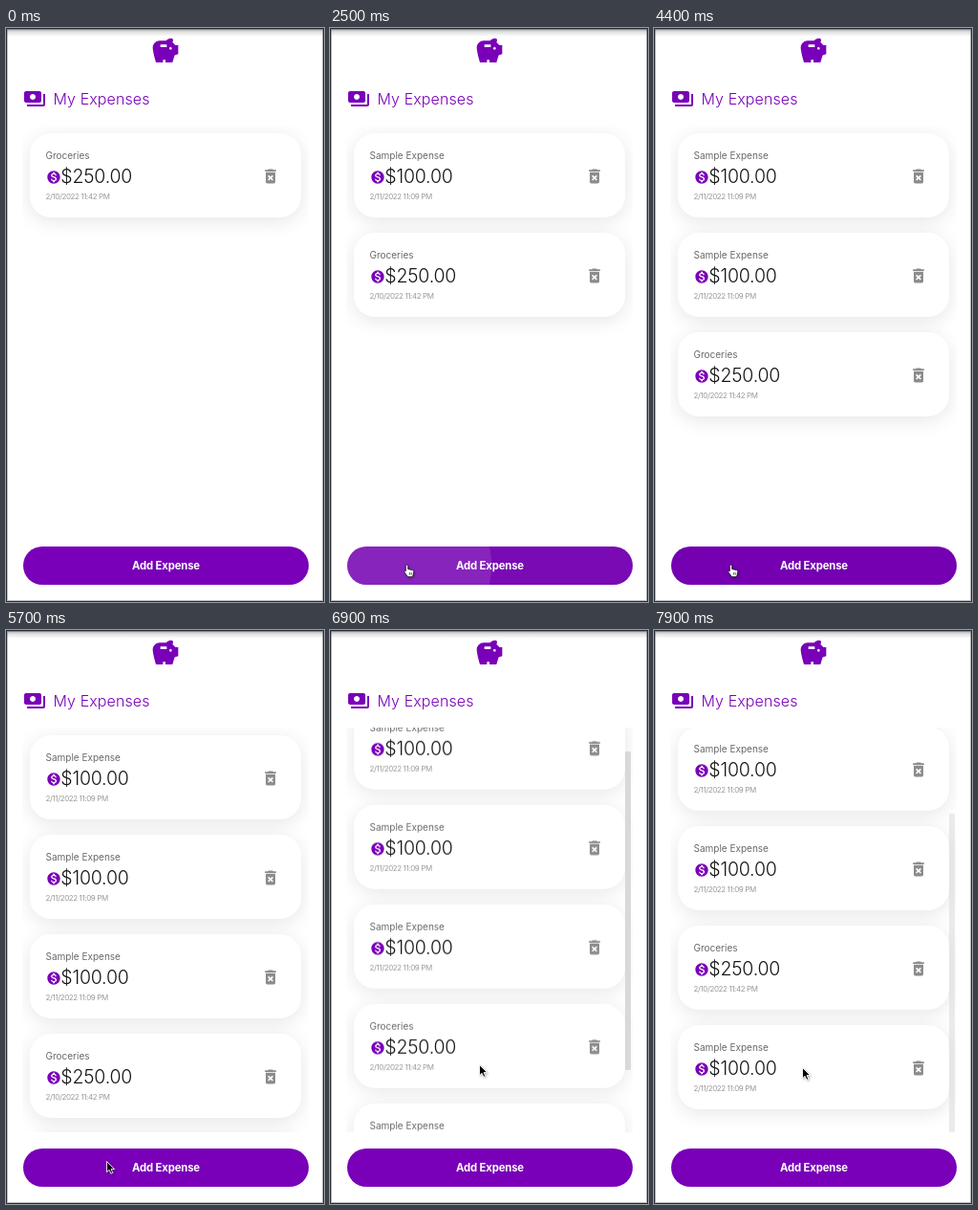
Animation of 333x600 px, one loop 8 s. Source, as an HTML page:

```html
<!DOCTYPE html>
<html lang="en">
<head>
<meta charset="utf-8">
<title>My Expenses</title>
<style>
  :root { --purple: #7900b8; --loop: 8s; }
  html, body { margin: 0; width: 100%; height: 100%; overflow: hidden; background: #fff; }
  body { position: relative; font-family: Inter, "Open Sans", sans-serif; white-space: nowrap; }
  body *, .press::after { position: absolute; box-sizing: border-box; }
  svg, path { overflow: visible; }
  symbol, defs { position: static; }

  .frame { inset: 0; box-shadow: inset 0 0 0 1px #262c39, inset 0 0 0 2px rgba(38,44,57,.3); }
  .top-shade { left: 0; right: 0; top: 0; height: 9px; background: linear-gradient(rgba(0,0,0,.42), rgba(0,0,0,.12) 45%, transparent); }
  .pig { left: 151.3px; top: 8.3px; width: 32px; height: 32px; fill: var(--purple); }
  .notes { left: 17.5px; top: 62px; width: 24px; height: 24px; fill: var(--purple); }
  .title { left: 49.5px; top: 64px; font-size: 16px; line-height: 21px; font-weight: 300; letter-spacing: .1px; color: var(--purple); }

  /* Expense list */
  .list { left: 17px; top: 102px; width: 300px; height: 423px; overflow: hidden; }
  .scroller { inset: 0; animation: scroll var(--loop) infinite; }
  .card { left: 8px; top: 8px; width: 284px; height: 88px; border-radius: 22px; background: #fff;
          box-shadow: 0 4px 20px rgba(0,0,0,.1); animation: var(--loop) step-end infinite; }
  .label { left: 16.5px; top: 17px; font-size: 10px; line-height: 12px; color: #686868; }
  .amount { left: 32.3px; top: 33px; font-size: 19.5px; line-height: 24px; font-weight: 300; letter-spacing: -.2px; color: #161616; }
  .date { left: 16.5px; top: 61px; font-size: 8px; line-height: 10px; letter-spacing: -.4px; color: #999; }
  .coin { left: 16.5px; top: 38px; width: 16px; height: 16px; fill: var(--purple); }
  .bin { left: 242px; top: 34.5px; width: 20px; height: 20px; fill: #8c8c8c; }
  .thumb { left: 292px; top: 0; width: 6px; height: 333px; background: #d9d9d9;
           animation: thumb var(--loop) infinite, thumb-fade var(--loop) infinite; }

  @keyframes scroll {
    0%, 83.75% { transform: none; animation-timing-function: ease-in; }
    86.25% { transform: translateY(-31px); animation-timing-function: ease-out; }
    93.75%, 100% { transform: translateY(-113px); }
  }
  @keyframes thumb {
    0%, 83.75% { transform: none; animation-timing-function: ease-in; }
    86.25% { transform: translateY(24.7px); animation-timing-function: ease-out; }
    93.75%, 100% { transform: translateY(90px); }
  }
  @keyframes thumb-fade {
    0%, 83.75% { opacity: 0; }
    86%, 96% { opacity: 1; }
    100% { opacity: .5; }
  }
  @keyframes first { 0% { opacity: 0; } 30%, 100% { opacity: 1; } }
  @keyframes second { 0% { opacity: 0; } 45%, 100% { opacity: 1; } }
  @keyframes third { 0% { opacity: 0; } 58.75%, 100% { opacity: 1; } }
  @keyframes last { 0% { opacity: 0; } 65%, 100% { opacity: 1; } }
  @keyframes pushed {
    0% { transform: none; }
    30% { transform: translateY(104px); }
    45% { transform: translateY(208px); }
    58.75%, 100% { transform: translateY(312px); }
  }

  /* Button with hover tint and press ripples */
  .button { left: 18px; top: 542px; width: 299px; height: 40px; border-radius: 20px; overflow: hidden; background: var(--purple); }
  .button span { inset: 0; text-align: center; color: #fff; font-size: 11.3px; font-weight: 700; line-height: 40px; letter-spacing: -.15px; }
  .hover { inset: 0; background: rgba(0,0,0,.04); animation: hover var(--loop) infinite; }
  .press { inset: 0; background: rgba(255,255,255,.04); opacity: 0; animation: press var(--loop) var(--at) infinite; }
  .press::after { content: ""; left: -177px; top: -220px; width: 480px; height: 480px; border-radius: 50%;
                  background: rgba(255,255,255,.11); animation: ripple var(--loop) var(--at) infinite; }
  @keyframes hover {
    0%, 19.5% { opacity: 0; }
    22.5%, 68.75% { opacity: 1; }
    71%, 100% { opacity: 0; }
  }
  @keyframes press { 0%, 3% { opacity: 1; } 6.5%, 100% { opacity: 0; } }
  @keyframes ripple {
    0% { transform: scale(.033); animation-timing-function: ease-in; }
    5%, 100% { transform: none; }
  }

  /* Pointer */
  .pointer { left: 0; top: 0; animation: move var(--loop) infinite; }
  .pointer svg { left: 0; top: 0; width: 14px; height: 16px; filter: drop-shadow(1px 1px 1px rgba(0,0,0,.3)); }
  .arrow { animation: arrow var(--loop) step-end infinite; }
  .hand { margin: -1px 0 0 -3px; animation: hand var(--loop) step-end infinite; }
  @keyframes move {
    0%, 8.75% { transform: translate(-14px, 470px); animation-timing-function: ease-in-out; }
    18.5%, 68.75% { transform: translate(80px, 561px); }
    71.25% { transform: translate(105px, 555px); animation-timing-function: linear; }
    79% { transform: translate(126px, 550px); }
    81.25%, 95% { transform: translate(156px, 454px); }
    98.75%, 100% { transform: translate(155px, 457px); }
  }
  @keyframes arrow { 0% { opacity: 0; } 8.75% { opacity: 1; } 16.25% { opacity: 0; } 70%, 100% { opacity: 1; } }
  @keyframes hand { 0% { opacity: 0; } 16.25% { opacity: 1; } 70%, 100% { opacity: 0; } }
</style>
</head>
<body>
<svg width="0" height="0">
  <symbol id="coin" viewBox="0 0 24 24"><path d="M12 2C6.48 2 2 6.48 2 12s4.48 10 10 10 10-4.48 10-10S17.52 2 12 2zm1.41 16.09V20h-2.67v-1.93c-1.71-.36-3.16-1.46-3.27-3.4h1.96c.1 1.05.82 1.87 2.65 1.87 1.96 0 2.4-.98 2.4-1.59 0-.83-.44-1.61-2.67-2.14-2.48-.6-4.18-1.62-4.18-3.67 0-1.72 1.39-2.84 3.11-3.21V4h2.67v1.95c1.86.45 2.79 1.86 2.85 3.39H14.3c-.05-1.11-.64-1.87-2.22-1.87-1.5 0-2.4.68-2.4 1.64 0 .84.65 1.39 2.67 1.91s4.18 1.39 4.18 3.91c-.01 1.83-1.38 2.83-3.12 3.16z"/></symbol>
  <symbol id="bin" viewBox="0 0 24 24"><path d="M6 19c0 1.1.9 2 2 2h8c1.1 0 2-.9 2-2V7H6zm2.46-7.12 1.41-1.41L12 12.59l2.12-2.12 1.41 1.41L13.41 14l2.12 2.12-1.41 1.41L12 15.41l-2.12 2.12-1.41-1.41L10.59 14zM15.5 4l-1-1h-5l-1 1H5v2h14V4z"/></symbol>
</svg>

<svg class="pig" viewBox="0 0 24 24"><path d="M19.83 7.5l-2.27-2.27c.07-.42.18-.81.32-1.15.08-.18.12-.37.12-.58C18 2.67 17.33 2 16.5 2c-1.64 0-3.09.79-4 2h-5C4.46 4 2 6.46 2 9.5S4.5 21 4.5 21H10v-2h2v2h5.5l1.68-5.59L22 14.47V7.5zM13 9H8V7h5zm3 2c-.55 0-1-.45-1-1s.45-1 1-1 1 .45 1 1-.45 1-1 1z"/></svg>
<svg class="notes" viewBox="0 0 24 24"><path d="M19 14V6c0-1.1-.9-2-2-2H3c-1.1 0-2 .9-2 2v8c0 1.1.9 2 2 2h14c1.1 0 2-.9 2-2zm-9-1c-1.66 0-3-1.34-3-3s1.34-3 3-3 3 1.34 3 3-1.34 3-3 3zm13-6v11c0 1.1-.9 2-2 2H4v-2h17V7z"/></svg>
<div class="title">My Expenses</div>

<div class="list">
  <div class="scroller"></div>
  <div class="thumb"></div>
</div>

<div class="button">
  <div class="hover"></div>
  <div class="press" style="--at: -5710ms"></div>
  <div class="press" style="--at: -4510ms"></div>
  <div class="press" style="--at: -3410ms"></div>
  <div class="press" style="--at: -2910ms"></div>
  <span>Add Expense</span>
</div>

<div class="top-shade"></div>
<div class="frame"></div>

<div class="pointer">
  <svg class="arrow" viewBox="0 0 14 16"><path d="M.5.5v11.2l2.6-2.4 1.8 4 1.9-.9L5 8.6h3.6z" fill="#000" stroke="#fff" stroke-width=".9"/></svg>
  <svg class="hand" viewBox="0 0 14 16"><path d="M3.4 1.2c.9 0 1.3.6 1.3 1.4v3l4.6 1c1 .2 1.5.9 1.4 1.9l-.6 3c-.2.9-.5 1.5-1 2.2H4.6L1 9c-.6-.9.5-1.9 1.3-1.2V2.6c0-.8.4-1.4 1.1-1.4zM6.3 9.3v2.2M8.2 9.3v2.2" fill="#fff" stroke="#111" stroke-width=".8"/></svg>
</div>

<script>
  const SLOT = 104;
  const sample = ["Sample Expense", "$100.00", "2/11/2022 11:09 PM"];
  const groceries = ["Groceries", "$250.00", "2/10/2022 11:42 PM"];

  function card([label, amount, date], slot, animation) {
    return `<div class="card" style="margin-top:${slot * SLOT}px; animation-name:${animation}">
      <div class="label">${label}</div>
      <svg class="coin"><use href="#coin"/></svg>
      <div class="amount">${amount}</div>
      <div class="date">${date}</div>
      <svg class="bin"><use href="#bin"/></svg>
    </div>`;
  }

  document.querySelector(".scroller").innerHTML = [
    card(sample, 0, "first"),
    card(sample, 1, "second"),
    card(sample, 2, "third"),
    card(groceries, 0, "pushed"),
    card(sample, 4, "last"),
  ].join("");
</script>
</body>
</html>
```
